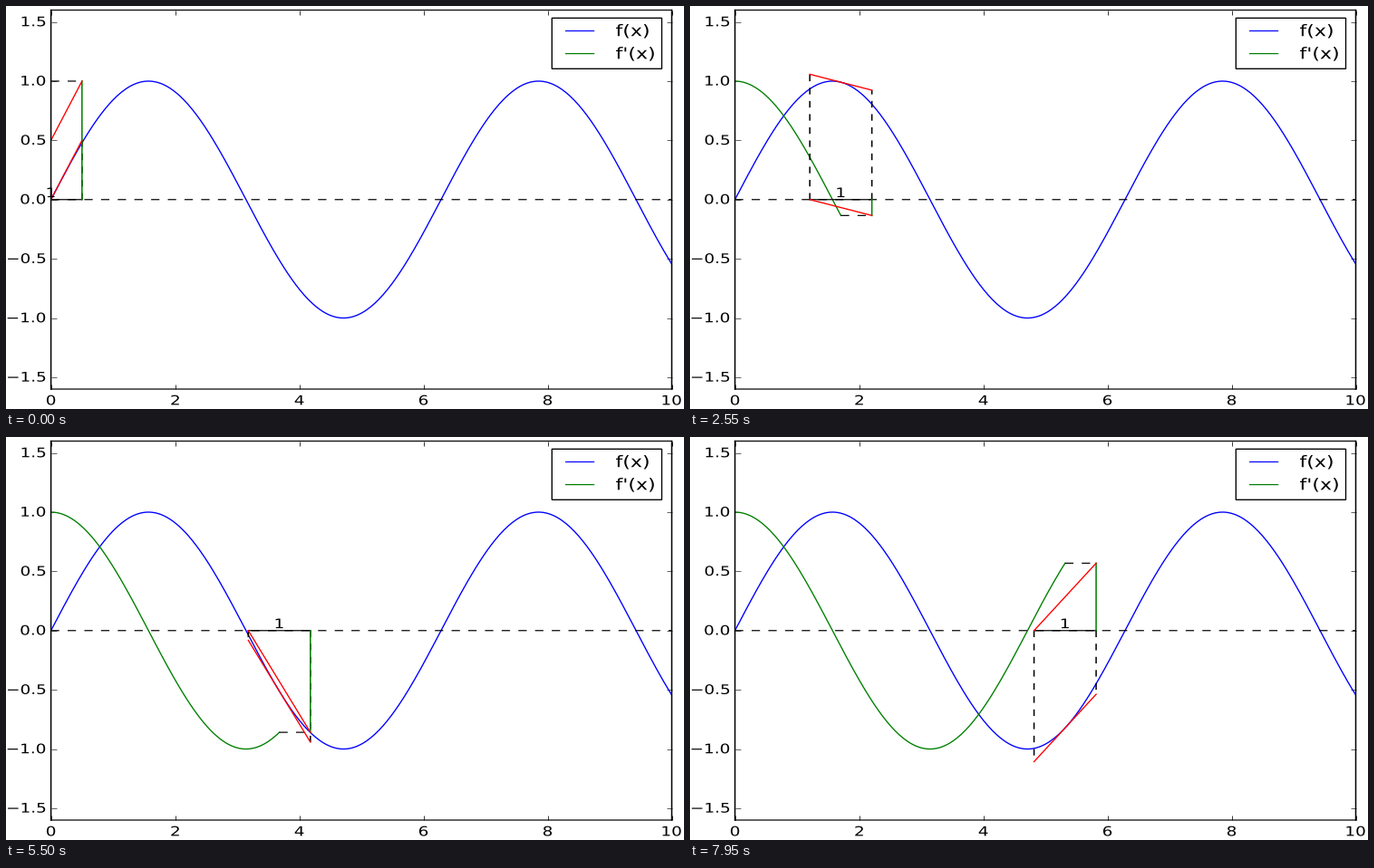
Recreate the animation shown at these times as a matplotlib script. Size 748 by 445 pixels, loop 8000 ms.

```python
import numpy as np
import matplotlib.pyplot as plt
from matplotlib.animation import FuncAnimation
from matplotlib.lines import Line2D
from matplotlib.patches import PathPatch, Rectangle
from matplotlib.textpath import TextPath
from matplotlib.transforms import Affine2D

W, H, DPI = 748, 445, 100
FRAMES, INTERVAL = 160, 50
SAMPLES = np.linspace(0, 10, 300)  # one sample per frame
KX, KY = 1.105, 0.871              # pixel aspect of the whole picture
LEFT, RIGHT, TOP, BOTTOM = 49.6, 734.5, 4.5, 423.0
BLUE, GREEN, RED = "#0000ff", "#008000", "#ff0000"

plt.rcParams["lines.scale_dashes"] = False
plt.rcParams["path.snap"] = False
plt.rcParams["font.family"] = "DejaVu Sans"

fig = plt.figure(figsize=(W / DPI, H / DPI), dpi=DPI, facecolor="white")
ax = fig.add_axes([LEFT / W, 1 - BOTTOM / H, (RIGHT - LEFT) / W, (BOTTOM - TOP) / H])
ax.set_xlim(0, 10)
ax.set_ylim(-1.6, 1.6)

# pixel coordinates, y pointing down
px = Affine2D().scale(1 / W, -1 / H).translate(0, 1) + fig.transFigure


def to_px(x, y):
    return (LEFT + x / 10 * (RIGHT - LEFT),
            TOP + (1.6 - y) / 3.2 * (BOTTOM - TOP))


def place(patch, x, y):
    patch.set_transform(Affine2D().scale(KX, -KY).translate(x, y) + px)


def label(s, x, y, points=12, align=0.5, zorder=3):
    """Text with its baseline at y; align 0, 0.5, 1 = left, centre, right."""
    path = TextPath((0, 0), s, size=points * DPI / 72, prop={"family": "DejaVu Sans"})
    box = path.get_extents()
    path = path.transformed(Affine2D().translate(-box.x0 - align * box.width, 0))
    patch = PathPatch(path, facecolor="black", linewidth=0, zorder=zorder)
    place(patch, x, y)
    fig.add_artist(patch)
    return patch


def stroke(color, width=0.98, zorder=2.0, dash=None):
    line, = ax.plot([], [], color=color, lw=width, zorder=zorder)
    if dash:
        line.set_linestyle((0, (dash, dash)))
    return line


# axes frame and ticks
ax.set_xticks(range(0, 11, 2))
ax.set_yticks(np.arange(-1.5, 1.6, 0.5))
ax.tick_params(direction="in", top=True, right=True,
               labelbottom=False, labelleft=False)
ax.tick_params(axis="x", length=4 * KY, width=0.5 * KX)
ax.tick_params(axis="y", length=4 * KX, width=0.5 * KY)
for side, spine in ax.spines.items():
    spine.set_linewidth(KX if side in ("left", "right") else KY)

for v in range(0, 11, 2):
    label(str(v), to_px(v, 0)[0], 440.4)
for v in np.arange(-1.5, 1.6, 0.5):
    text = f"{v:.1f}".replace("-", "\u2212")
    label(text, 43.2, to_px(0, v)[1] + 4.7, align=1)

# legend
fig.add_artist(Rectangle((602.3, 13.3), 121.2, 56, transform=px, facecolor="white",
                         edgecolor="black", lw=0.98, zorder=4))
for name, color, y in (("f(x)", BLUE, 27.5), ("f'(x)", GREEN, 52.6)):
    fig.add_artist(Line2D([617.6, 648.6], [y, y], transform=px, color=color,
                          lw=KY, zorder=5))
    label(name, 673, y + 5.7, points=14.4, align=0, zorder=5)

# fixed curves
stroke(BLUE).set_data(SAMPLES, np.sin(SAMPLES))
stroke("black", KY, 2.1, 6 * KX).set_data([0, 10], [0, 0])

# moving parts
slope_curve = stroke(GREEN, zorder=2.05)
left_drop = stroke("black", KX, 2.2, 6 * KY)
right_drop = stroke("black", KX, 2.2, 6 * KY)
level = stroke("black", KY, 2.2, 6 * KX)
base = stroke("black", KY, 2.2)
rise = stroke(GREEN, KX, 2.3)
tangent = stroke(RED, zorder=2.4)
slant = stroke(RED, zorder=2.4)
one = label("1", 0, 0)


def update(n):
    x = SAMPLES[n]
    y, k = np.sin(x), np.cos(x)
    a, b = x - 0.5, x + 0.5
    ya, yb = y - k / 2, y + k / 2
    t = SAMPLES[:n + 1]
    slope_curve.set_data(t, np.cos(t))
    tangent.set_data([a, b], [ya, yb])
    slant.set_data([a, b], [0, k])
    base.set_data([a, b], [0, 0])
    rise.set_data([b, b], [0, k])
    left_drop.set_data([a, a], [0, ya])
    right_drop.set_data([b, b], [0, yb])
    level.set_data([x, b], [k, k])
    place(one, *to_px(x, 0.02))
    return []


anim = FuncAnimation(fig, update, frames=FRAMES, interval=INTERVAL,
                     init_func=lambda: update(0), repeat=True,
                     repeat_delay=0, blit=False)
plt.show()
```
